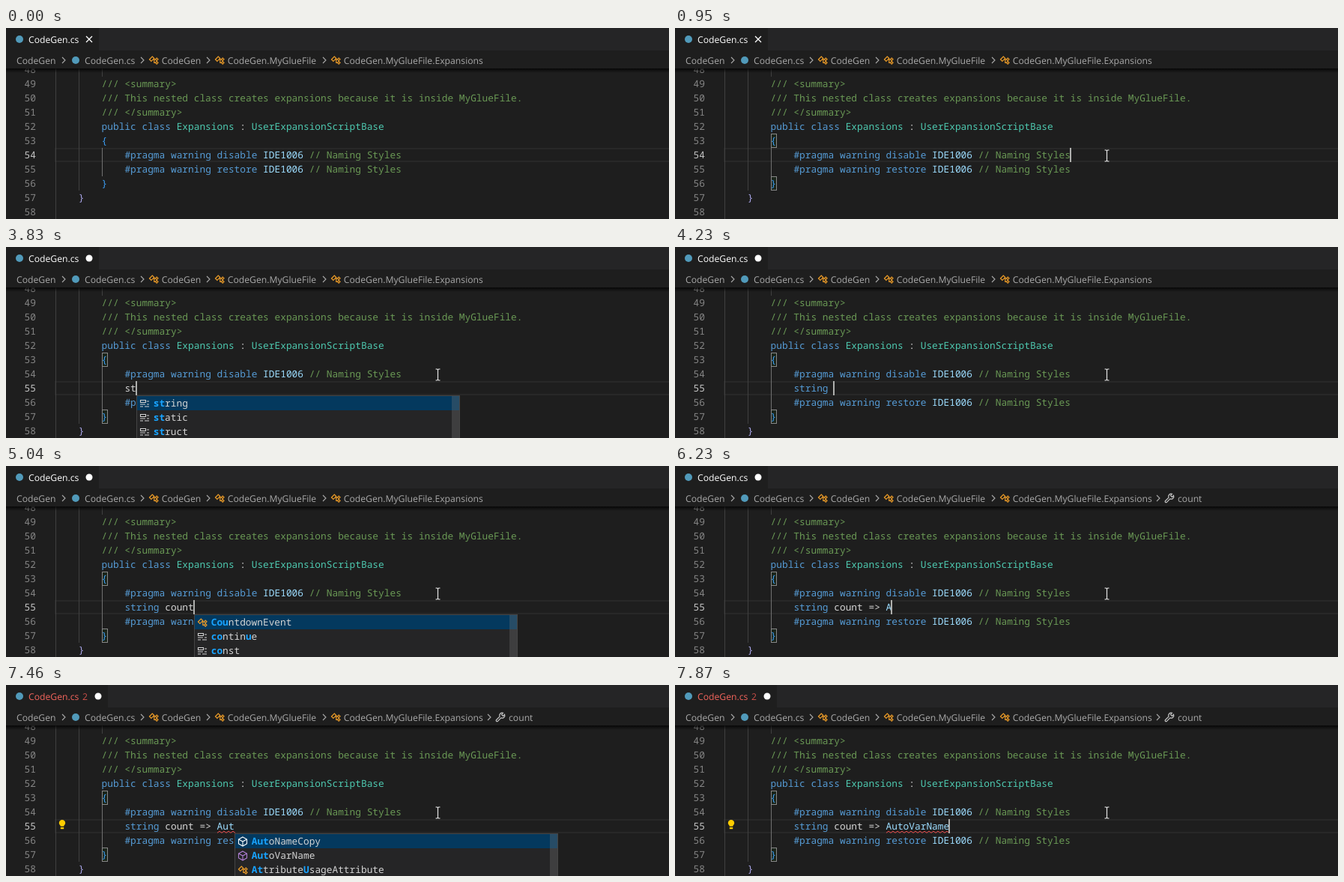
An HTML page for the animation above (8 s loop, 885 by 255 pixels).

```html
<!DOCTYPE html>
<html lang="en">
<head>
<meta charset="utf-8">
<title>Code editor typing</title>
<style>
html, body { margin: 0; width: 100%; height: 100%; overflow: hidden; background: #1e1e1e; }
svg { display: block; text-rendering: geometricPrecision; }
text { white-space: pre; }
.code { font: 12.83px "Noto Sans Mono", "DejaVu Sans Mono", monospace; }
.ui { font: 12.2px "Open Sans", "Noto Sans", sans-serif; }
</style>
</head>
<body>
<svg id="stage" width="885" height="255" viewBox="0 0 885 255"></svg>
<script>
const LOOP = 8000, CHAR = 7.698, LEFT = 66, LINE = 19;
const GREEN = '#6a9955', BLUE = '#569cd6', TEAL = '#4ec9b0', PLAIN = '#d4d4d4', PALE = '#9cdcfe',
  ORANGE = '#ee9d28', PURPLE = '#b180d7', MATCH = '#18a3ff', CRUMB = '#a9a9a9';

const TYPED = 'string count => AutoVarName';
// [time, number of characters typed]
const KEYS = [[2080, 0], [3620, 1], [3770, 2], [3970, 3], [4060, 4], [4150, 6], [4230, 7], [4630, 8],
  [4700, 10], [4900, 11], [4970, 12], [5100, 13], [5240, 14], [5570, 15], [5840, 16], [6170, 17],
  [6300, 18], [6430, 19], [7800, 27]];
const CARET_OFF = [[0, 890], [1350, 1880], [2550, 3010], [3490, 3620], [7040, 7530]];
// Matched letters are enclosed in *
const POPUPS = [
  [3830, 4230, [['key', '*st*ring'], ['key', '*st*atic'], ['key', '*st*ruct']]],
  [4700, 5100, [['class', '*Cou*ntdownEvent'], ['key', '*co*ntin*u*e'], ['key', '*co*nst']]],
  [6500, 7800, [['cube', '*Aut*oNameCopy'], ['cube', '*Aut*oVarName'], ['class', '*At*tribute*U*sageAttribute']]]
];

const within = (t, [from, to]) => t >= from && t < to;
const rowY = n => 160 + (n - 54) * LINE;
const colX = c => LEFT + c * CHAR;
const esc = s => s.replace(/</g, '&lt;').replace(/>/g, '&gt;');
const rect = (x, y, w, h, fill, more = '') => `<rect x="${x}" y="${y}" width="${w}" height="${h}" fill="${fill}" ${more}/>`;
const dot = (x, y, r, fill) => `<circle cx="${x}" cy="${y}" r="${r}" fill="${fill}"/>`;
const path = (d, stroke, x = 0, y = 0, width = 1, fill = 'none') =>
  `<path transform="translate(${x} ${y})" d="${d}" stroke="${stroke}" stroke-width="${width}" fill="${fill}"/>`;
const text = (x, y, s, fill, cls = 'code', more = '') =>
  `<text class="${cls}" x="${x}" y="${y}" fill="${fill}" ${more}>${esc(s)}</text>`;
const code = (n, col, ...parts) => `<text class="code" x="${colX(col)}" y="${rowY(n) + 14}">` +
  parts.map(([fill, s]) => `<tspan fill="${fill}">${esc(s)}</tspan>`).join('') + '</text>';

const icons = {
  class: (x, y) => path('M-5.5 -1L-1.7 -4.8L.7 -2.4L-3.1 1.4ZM-.5 -1.2H2.5M.8 -1.2V3.3H2.5M2.4 -1.2L4.2 -3L6 -1.2L4.2 .6ZM2.4 3.3L4.2 1.5L6 3.3L4.2 5.1Z', ORANGE, x, y, 1.2),
  cube: (x, y, selected) => path('M0 -6L5.5 -3V3L0 6L-5.5 3V-3ZM-5.5 -3L0 0L5.5 -3M0 0V6', selected ? '#fff' : PURPLE, x, y, 1.1),
  key: (x, y) => path('M-5.5 -4.5H1.5V-1.5H-5.5ZM3 -3H6M-6 1H1M3 1H6M-6 4H-2M0 4H6', PLAIN, x, y, 1.1),
  wrench: (x, y) => path('M5.6 -3.6A3.6 3.6 0 0 1 .8 .9L-3.6 5.3A1.2 1.2 0 0 1 -5.4 3.5L-1 -.9A3.6 3.6 0 0 1 3.5 -5.7L1.5 -3.6L3.5 -1.6Z', '#c5c5c5', x, y, 1.2),
  bulb: (x, y) => path('M-2.2 2.2C-2.2 .6 -4.2 0 -4.2 -2.2A4.2 4.2 0 0 1 4.2 -2.2C4.2 0 2.2 .6 2.2 2.2ZM-2.2 3.4H2.2V5.8H-2.2Z', 'none', x, y, 0, '#ffcc00')
};
const chevron = x => path('M-2 -4L2 0L-2 4', CRUMB, x, 43, 1.1);
const crumb = (x, s) => text(x, 47.5, s, CRUMB, 'ui');

function header(t) {
  const edited = t >= 2080, failed = t >= 7460, closeX = failed ? 123 : 111, tab = closeX + 13;
  let out = rect(0, 0, 885, 54, '#1e1e1e') + rect(tab, 0, 885 - tab, 30, '#252526') + dot(18, 15, 5, '#519aba') +
    text(30, 19.5, 'CodeGen.cs', failed ? '#f4655c' : '#fff', 'ui');
  if (failed) out += text(102, 19.5, '2', '#d0504a', 'ui');
  out += edited ? dot(closeX, 15, 4.5, '#fff') : path('M-4 -4L4 4M4 -4L-4 4', '#fff', closeX, 15, 1.3);
  out += crumb(14, 'CodeGen') + chevron(77) + dot(93, 43, 5, '#519aba') + crumb(105, 'CodeGen.cs');
  [[197, 'CodeGen'], [285, 'CodeGen.MyGlueFile'], [440, 'CodeGen.MyGlueFile.Expansions']].forEach(([x, s]) => {
    out += chevron(x - 15) + icons.class(x, 43) + crumb(x + 10.7, s);
  });
  if (t >= 5640) out += chevron(645) + icons.wrench(660, 43) + crumb(671, 'count');
  return out + rect(0, 54, 885, 6, 'url(#shade)');
}

function editor(t, typed) {
  const extra = t >= 2080 ? 1 : 0, current = 54 + extra, last = 56 + extra;
  let out = rect(LEFT, rowY(current) + 1, 820, 17, 'none', 'stroke="#282828" stroke-width="2"');
  const guide = (x, from, to, fill = '#404040') => out += rect(x, rowY(from), 1, (to - from) * LINE, fill);
  guide(66, 48, 60);
  guide(97, 48, last + 1);
  guide(128, 48, 49);
  guide(128, 54, last, '#707070');
  for (let n = 48; n < 59; n++)
    out += text(40, rowY(n) + 14, `${n}`, n == current ? '#c6c6c6' : '#858585', 'code', 'text-anchor="end"');

  if (t >= 950) for (const n of [53, last])
    out += rect(128.5, rowY(n) + .5, 7, 18, 'rgba(0,100,0,.1)', 'stroke="#888"');
  const pragma = (n, verb) => code(n, 12, [BLUE, `#pragma warning ${verb} `], [PALE, 'IDE1006 '], [GREEN, '// Naming Styles']);
  out += code(49, 8, [GREEN, '/// <summary>']) +
    code(50, 8, [GREEN, '/// This nested class creates expansions because it is inside MyGlueFile.']) +
    code(51, 8, [GREEN, '/// </summary>']) +
    code(52, 8, [BLUE, 'public class '], [TEAL, 'Expansions'], [PLAIN, ' : '], [TEAL, 'UserExpansionScriptBase']) +
    code(53, 8, ['#3b9cf0', '{']) + pragma(54, 'disable') + pragma(55 + extra, 'restore') +
    code(last, 8, ['#3b9cf0', '}']) + code(last + 1, 4, ['#a9a5e8', '}']);
  if (!extra) out += '';
  else out += code(55, 12, [typed.length < 6 ? PLAIN : BLUE, typed.slice(0, 6)],
    [PLAIN, typed.slice(6, 16)], [PALE, typed.slice(16)]);

  if (t >= 7040) out += icons.bulb(75, 186.5);
  if (t >= 7320) {
    const waves = Math.round((typed.length - 16) * CHAR / 6);
    out += path('M0 0' + 'l3 -2.2l3 2.2'.repeat(waves), '#f14c4c', 282, 197.4);
  }
  if (!CARET_OFF.some(span => within(t, span))) {
    const x = colX(extra ? 12 + typed.length : 60);
    out += rect(Math.round(x) - 1, rowY(current), 2, LINE, '#aeafad');
  }
  return out;
}

function popup(t, typed) {
  const shownList = POPUPS.find(p => within(t, p));
  if (!shownList) return '';
  const x = Math.round(colX(12 + typed.length)), chosen = t >= 7530 ? 1 : 0;
  let out = rect(x + .5, 198.5, 431, 70, '#252526', 'stroke="#454545"');
  shownList[2].forEach(([icon, label], i) => {
    const y = 199 + i * LINE;
    if (i == chosen) out += rect(x + 1, y, 430, LINE, '#04395e');
    out += icons[icon](x + 11, y + 10, i == chosen) + `<text class="code" x="${x + 22.7}" y="${y + 14}">` +
      label.split('*').map((s, j) => `<tspan fill="${j % 2 ? MATCH : PLAIN}" font-weight="${j % 2 ? 700 : 400}">${s}</tspan>`).join('') + '</text>';
  });
  return out + rect(x + 421, 199, 10, 69, 'rgba(121,121,121,.3)');
}

function pointer(t) {
  if (t < 130) return '';
  const p = Math.min(1, Math.floor((t - 130) / 69) / 10), e = 1 - (1 - p) ** 2;
  const x = 778 - 202 * e, y = 238 - 68 * e - 6 * Math.sin(Math.PI * p ** 3);
  return path('M-3 -7.5H-1L0 -6.5L1 -7.5H3M0 -6.5V6.5M-3 7.5H-1L0 6.5L1 7.5H3', '#e4e4e4', Math.round(x) + .5, Math.round(y) + .5, 1.2);
}

const stage = document.getElementById('stage');
const defs = '<defs><linearGradient id="shade" x2="0" y2="1"><stop stop-color="#000" stop-opacity=".75"/><stop offset="1" stop-color="#000" stop-opacity="0"/></linearGradient></defs>';
let shown = '';
function draw(now) {
  const t = now % LOOP;
  const key = KEYS.filter(k => k[0] <= t).pop();
  const typed = TYPED.slice(0, key ? key[1] : 0);
  const picture = defs + editor(t, typed) + header(t) + popup(t, typed) + pointer(t);
  if (picture != shown) stage.innerHTML = shown = picture;
}
const start = performance.now();
function tick() {
  draw(performance.now() - start);
  requestAnimationFrame(tick);
}
tick();
</script>
</body>
</html>
```
